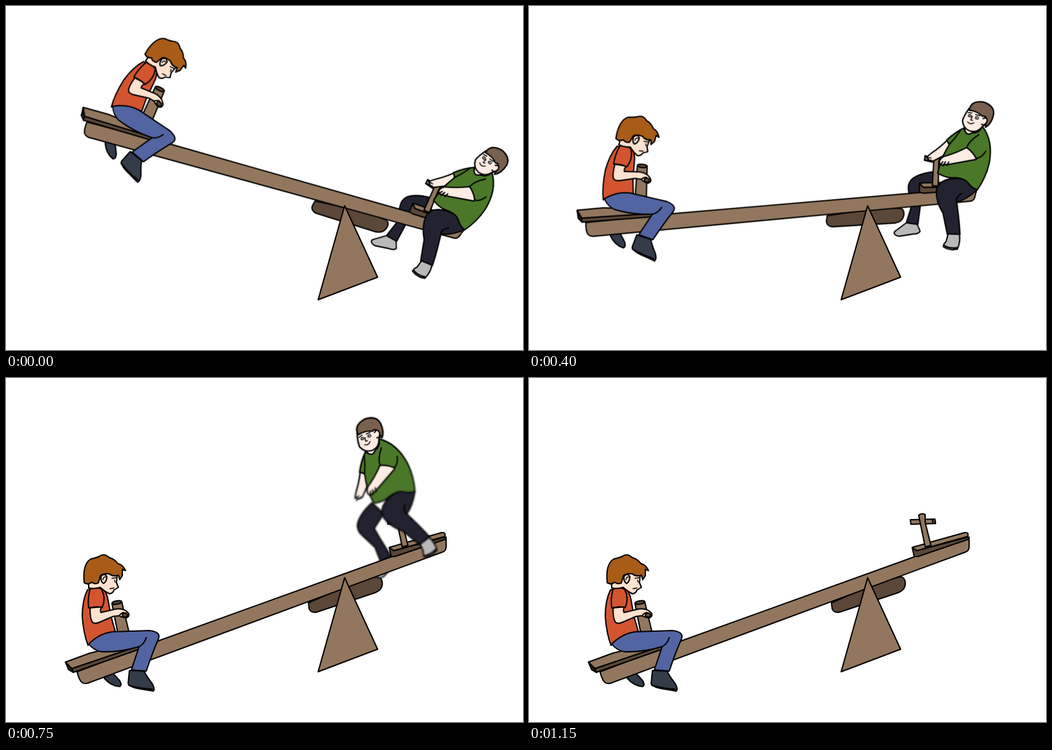
These frames come from a looping animation (800 px wide and 534 px high, 1500 ms). An HTML page:

```html
<!DOCTYPE html>
<html lang="en">
<head>
<meta charset="utf-8">
<title>Seesaw</title>
<style>
  html, body { margin: 0; width: 100%; height: 100%; overflow: hidden; background: #fff; }
  svg { display: block; width: 100vw; height: 100vh; }
  path, ellipse { stroke: #000; stroke-width: 2; stroke-linejoin: round; stroke-linecap: round; }
  .line { fill: none; }
  .thin { fill: none; stroke-width: 1.5; }
  .wood { fill: #92775e; }
  .dark { fill: #5c4838; }
  .end { fill: #2a1f18; }
  .skin { fill: #fde2cf; }
  .red { fill: #d35530; }
  .jeans { fill: #5265a2; }
  .ginger { fill: #a85c18; }
  .boot { fill: #343b49; }
  .pale { fill: #fdece3; }
  .green { fill: #4b7828; }
  .navy { fill: #222231; }
  .brown { fill: #7a604e; }
  .grey { fill: #b9b9b9; }
  .dot { fill: #000; }
  .eye { fill: #fff; stroke-width: 1.2; }
  .dot, .bare { stroke: none; }
</style>
</head>
<body>
<svg viewBox="0 0 800 534" preserveAspectRatio="none">
  <defs>
    <linearGradient id="fade" gradientUnits="userSpaceOnUse" x1="0" y1="178" x2="0" y2="232">
      <stop offset="0" stop-color="#fff"/>
      <stop offset="1" stop-color="#000"/>
    </linearGradient>
    <mask id="upper" maskUnits="userSpaceOnUse" x="540" y="90" width="200" height="290">
      <rect x="540" y="90" width="200" height="290" fill="url(#fade)"/>
    </mask>
  </defs>

  <g id="board">
    <!-- behind the beam -->
    <path class="boot" d="M152 461L164 457Q170 463 176 470Q180 477 176 479Q162 478 152 466Z"/>
    <path class="dark" d="M468 349L469 358Q472 366 482 363L572 333Q584 328 582 316Q580 307 572 309L545 315Z"/>
    <g class="man"><g class="blur">
      <path class="navy" d="M614 239Q590 247 580 260Q575 268 579 278L590 304L589 328L607 326L603 296L601 277L624 262Z"/>
      <path class="grey" d="M589 328L606 326L613 335Q612 340 604 342L584 351Q574 352 575 346Z"/>
    </g></g>

    <!-- beam, seats and handles -->
    <path class="wood" d="M110 456Q113 469 118 473Q123 476 131 472L676 270Q681 268 681 262L681 247L240 406.500Z"/>
    <path class="end" d="M92 441L102 451L104 457L97 453Z"/>
    <path class="dark" d="M102 451L210 414L212 419L104 457Z"/>
    <path class="wood" d="M92 441L130 427L200 410L208 415L102 451Z"/>
    <path class="dark" d="M593 263L600 268L679 247L681 250L602 277L596 277Z"/>
    <path class="wood" d="M593 263L617 256L674 240Q681 239 679 246L600 268Z"/>
    <path class="wood" d="M590 220L628 219L629 226L591 227Z"/>
    <path class="dark" d="M624 219L628 219L629 226L625 226Z"/>
    <path class="wood" d="M603 213Q607 209 613 212L613 224L622 260L613 262L606 228Z"/>

    <!-- boy -->
    <path class="wood" d="M164 350L179 347L190 393L173 396Z"/>
    <ellipse class="dark" cx="171.500" cy="348.500" rx="7.500" ry="2.600" transform="rotate(-9 171.500 348.500)"/>
    <path class="red" d="M126 329Q118 345 118 370Q120 398 127 415Q142 400 169 393L163 372L157 340Q153 326 144 325Z"/>
    <path class="jeans" d="M128 413Q145 396 165 394L222 392Q240 394 236 405Q227 425 217 455L194 453L206 417Q175 426 148 425Q136 423 128 413Z"/>
    <path class="line" d="M206 417Q214 413 217 403"/>
    <path class="boot" d="M191 454L214 455Q216 461 226 474Q231 483 228 486L210 483Q190 480 189 474Z"/>
    <path class="line" d="M190 477Q207 482 226 483"/>
    <path class="skin" d="M130 357Q130 372 133 378Q136 383 145 379L166 370L175 369Q182 373 187 372Q191 370 190 366Q187 361 180 359Q172 357 164 360L147 364Q145 360 148 355Z"/>
    <path class="line" d="M175 369Q178 365 182 364"/>
    <ellipse class="dark" cx="184" cy="368" rx="4" ry="3.200"/>
    <path class="red" d="M130 328Q126 343 128 357Q139 354 149 356Q155 342 148 328Q139 323 130 328Z"/>
    <path class="skin" d="M128 317L128 326Q136 328 146 325Q152 331 160 335Q166 334 167 329L174 325L171 318L172 306L158 302L138 308Z"/>
    <path class="ginger" d="M121 318Q118 289 131 281Q140 279 144 277Q152 271 160 279Q168 281 173 288Q181 290 185 299L180 297L180 307L176 313L174 306Q165 309 160 304Q150 303 146 307L143 318Q137 321 133 317L127 320Z"/>
    <path class="skin" d="M147 308Q152 302 156 308Q156 316 151 319Q146 316 147 308Z"/>
    <path class="thin" d="M150 313Q151 308 154 309M164 311L171 310M168 314L169 317M161 327L167 326"/>

    <!-- man -->
    <g class="man">
      <g class="blur"><g id="body">
        <path class="pale" d="M617 188Q608 203 599 213L594 220Q596 227 604 225L617 213L622 194Z"/>
        <path class="thin" d="M592 222L600 221M593 226L602 224"/>
        <path class="navy" d="M640 243Q619 252 621 268Q625 285 640 299L655 329L674 324Q667 303 661 289Q658 281 656 277Q669 270 682 250Q675 240 660 238Z"/>
        <path class="line" d="M656 277Q652 270 660 262"/>
        <path class="grey" d="M656 328L673 324Q678 335 676 347Q665 353 654 349Q653 345 656 340Z"/>
        <path class="line" d="M655 347Q665 350 675 345"/>
        <path class="green" d="M637 163Q626 172 616 188L622 193Q615 215 616 241Q630 245 640 242Q655 237 665 243Q673 250 682 250Q690 228 689 205Q686 170 664 153Q662 165 651 167Q644 175 637 163Z"/>
        <path class="line" d="M633 167Q629 180 622 193"/>
        <path class="pale" d="M638 162Q643 176 652 166L652 160Z"/>
        <path class="pale" d="M649 191Q635 204 618 214Q611 221 616 228L630 223Q645 216 668 205Q667 197 649 191Z"/>
        <path class="line" d="M616 228L619 222M621 228L623 221M627 226L628 220"/>
        <path class="green bare" d="M662 167Q650 180 649 191L670 204Q678 200 679 188Z"/>
        <path class="line" d="M662 167Q650 180 649 191Q660 195 667 203Q675 202 679 189"/>
        <path class="pale" d="M637 131Q632 145 632 152Q636 164 648 165Q660 164 664 153Q669 149 668 141L662 136Q650 130 639 130Z"/>
        <path class="brown" d="M638 134Q636 118 657 116Q675 118 676 132Q676 147 669 153L667 140Q664 135 660 138Q650 132 638 134Z"/>
        <path class="pale" d="M662 141Q668 136 669 144Q667 152 662 150"/>
        <path class="thin" d="M637 138L643 137M649 138L656 138M645 142L644 148L647 148M640 152Q645 156 650 151"/>
        <ellipse class="eye" cx="641" cy="142" rx="2.300" ry="1.900"/>
        <ellipse class="eye" cx="652.500" cy="142.500" rx="2.500" ry="1.900"/>
        <ellipse class="dot" cx="641" cy="142" rx=".8" ry=".8"/>
        <ellipse class="dot" cx="652" cy="142.500" rx=".8" ry=".8"/>
      </g></g>
      <g mask="url(#upper)"><use href="#body"/></g>
    </g>
  </g>

  <path class="wood" d="M524 310L575 421L483 456Z"/>
</svg>

<script>
const LOOP = 1500, TICK = 50, TICKS = LOOP / TICK;
const LIFT = 12, GONE = 23;

// [tick, degrees, pivot x, pivot y]
const TILT = [
  [0, 35.8, 546.5, 303.8], [3, 30.8, 536.7, 303.2], [5, 24, 542.5, 296.4],
  [8, 15, 525.7, 302.3], [11, 2.6, 517.5, 310], [12, 0, 524, 310]
];
// [tick, degrees, head x, head y]
const FLIGHT = [[LIFT, 0, 655, 140], [18, -48, 472, 33], [22, -80, 335, -38]];

function sample(keys, n) {
  if (n <= keys[0][0]) return keys[0].slice(1);
  const i = keys.findIndex(k => k[0] >= n);
  if (i < 0) return keys[keys.length - 1].slice(1);
  const a = keys[i - 1], b = keys[i];
  const u = (n - a[0]) / (b[0] - a[0]);
  return a.slice(1).map((v, j) => v + (b[j + 1] - v) * u);
}

function turn(keys, n, cx, cy) {
  const [deg, x, y] = sample(keys, n);
  return `translate(${x}px, ${y}px) rotate(${deg}deg) translate(${-cx}px, ${-cy}px)`;
}

// Holds each pose for one tick.
function play(selector, pose) {
  const frames = [];
  for (let n = 0; n <= TICKS; n++) {
    frames.push({ ...pose(Math.min(n, TICKS - 1)), offset: n / TICKS, easing: 'steps(1, end)' });
  }
  for (const el of document.querySelectorAll(selector)) {
    el.animate(frames, { duration: LOOP, iterations: Infinity }).startTime = 0;
  }
}

play('#board', n => ({ transform: turn(TILT, n, 524, 310) }));
play('.man', n => ({
  transform: turn(FLIGHT, n, 655, 140),
  opacity: n < GONE ? 1 : 0
}));
play('.blur', n => ({ filter: `blur(${Math.max(0, n - LIFT) * 0.4}px)` }));
</script>
</body>
</html>
```
